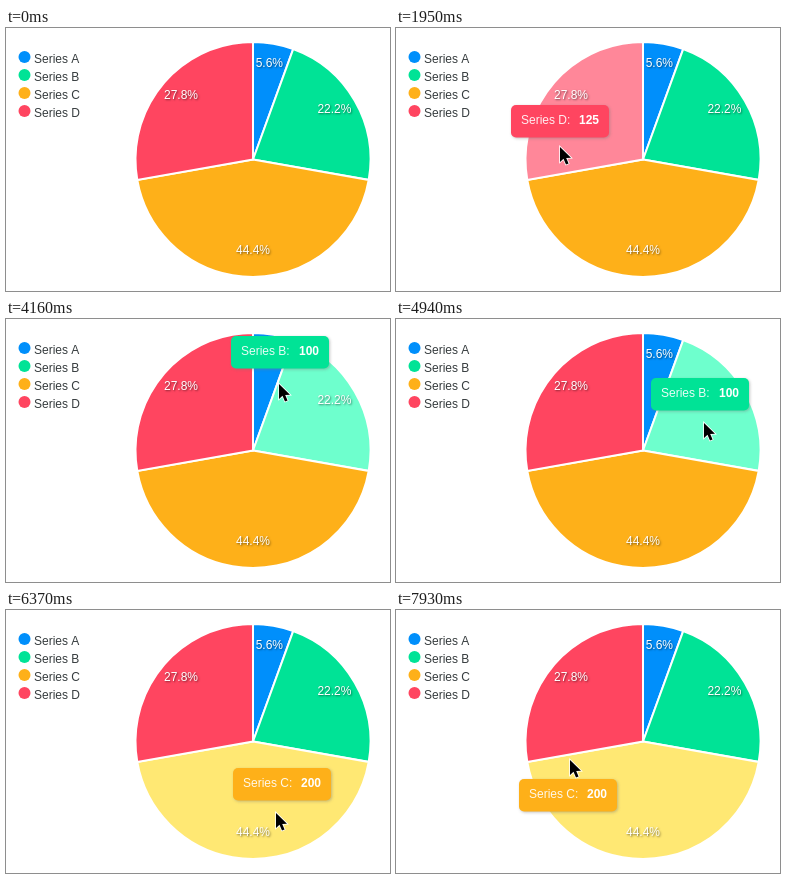
These frames come from a looping animation (384 by 263 pixels, 8 s). An HTML page with a canvas:

```html
<!DOCTYPE html>
<html lang="en">
<head>
<meta charset="utf-8">
<title>Pie chart</title>
<style>
html, body { margin: 0; width: 100%; height: 100%; overflow: hidden; background: #fff; }
canvas { display: block; }
</style>
</head>
<body>
<canvas id="stage" width="384" height="263"></canvas>
<script>
const ctx = document.getElementById('stage').getContext('2d');
const LOOP = 8000, STEP = 130;
const CX = 247, CY = 131.5, R = 117.5, LABEL_R = 94;
const FONT = '12px "Liberation Sans", Arial, sans-serif';

const series = [
  { name: 'Series A', value: 25, color: '#008ffb', lit: '#66bfff' },
  { name: 'Series B', value: 100, color: '#00e396', lit: '#6effcd' },
  { name: 'Series C', value: 200, color: '#feb019', lit: '#ffe873' },
  { name: 'Series D', value: 125, color: '#ff4560', lit: '#ff8799' }
];
const total = series.reduce((sum, s) => sum + s.value, 0);
let turn = 0;
for (const s of series) {
  s.from = turn;
  turn += s.value / total * Math.PI * 2;
  s.to = turn;
}

// Pointer path: step, x, y
const path = [
  [10, 215, -20], [11, 208, 0], [12, 196, 42], [13, 180, 88],
  [14, 163.5, 119], [15, 164, 119], [18, 158, 112], [20, 170, 118],
  [22, 178.5, 110], [23, 247, 68], [24, 258, 62], [28, 262, 57],
  [31, 274, 59], [32, 273, 65], [34, 284, 84], [38, 308, 104],
  [40, 298, 122], [42, 278, 172], [43, 279, 184], [46, 283, 196],
  [50, 268, 204], [53, 253, 207], [54, 176, 214], [56, 165, 208],
  [58, 168, 210], [60, 172, 211], [61, 174, 150]
];

function pointerAt(step) {
  if (step < path[0][0]) return null;
  const i = path.findIndex(p => p[0] >= step);
  if (i < 0) return path[path.length - 1].slice(1);
  if (i === 0) return path[0].slice(1);
  const [s0, x0, y0] = path[i - 1], [s1, x1, y1] = path[i];
  const u = (step - s0) / (s1 - s0), k = u * u * (3 - 2 * u);
  return [x0 + (x1 - x0) * k, y0 + (y1 - y0) * k];
}

function sliceAt(p) {
  if (!p || Math.hypot(p[0] - CX, p[1] - CY) > R) return null;
  const a = (Math.atan2(p[0] - CX, CY - p[1]) + Math.PI * 2) % (Math.PI * 2);
  return series.find(s => a < s.to);
}

function text(str, x, y, color, align = 'left', font = FONT) {
  ctx.font = font;
  ctx.textAlign = align;
  ctx.fillStyle = color;
  ctx.fillText(str, x, y);
}

function shadow(color, blur, offset) {
  ctx.shadowColor = color;
  ctx.shadowBlur = blur;
  ctx.shadowOffsetX = ctx.shadowOffsetY = offset;
}

function drawLegend() {
  series.forEach((s, i) => {
    const y = 29 + i * 18;
    ctx.fillStyle = s.color;
    ctx.beginPath();
    ctx.arc(18.5, y, 6, 0, Math.PI * 2);
    ctx.fill();
    text(s.name, 28, y + 6, '#373d3f');
  });
}

function drawPie(active) {
  ctx.strokeStyle = '#fff';
  ctx.lineWidth = 2;
  for (const s of series) {
    ctx.beginPath();
    ctx.moveTo(CX, CY);
    ctx.arc(CX, CY, R, s.from - Math.PI / 2, s.to - Math.PI / 2);
    ctx.closePath();
    ctx.fillStyle = s === active ? s.lit : s.color;
    ctx.fill();
    ctx.stroke();
  }
  ctx.save();
  shadow('rgba(0,0,0,0.5)', 2, 1);
  for (const s of series) {
    const mid = (s.from + s.to) / 2;
    const share = (s.value / total * 100).toFixed(1) + '%';
    text(share, CX + LABEL_R * Math.sin(mid), CY - LABEL_R * Math.cos(mid), '#fff', 'center');
  }
  ctx.restore();
}

function drawTooltip(s, p) {
  const x = Math.round(p[0] - 49), y = Math.round(p[1] - 42);
  ctx.save();
  shadow('rgba(120,120,120,0.45)', 3, 1);
  ctx.fillStyle = s.color;
  ctx.beginPath();
  ctx.roundRect(x, y, 98, 32.5, 5);
  ctx.fill();
  ctx.restore();
  text(s.name + ':', x + 10, y + 19, 'rgba(255,255,255,0.9)');
  text(s.value, x + 68, y + 19, '#fff', 'left', 'bold ' + FONT);
}

function drawPointer(p) {
  ctx.save();
  ctx.translate(Math.round(p[0]), Math.round(p[1]));
  ctx.beginPath();
  ctx.moveTo(0, 0);
  for (const [x, y] of [[0, 15], [3.5, 11.8], [6, 17.5], [8.6, 16.4], [6.2, 10.9], [11, 10.7]]) {
    ctx.lineTo(x, y);
  }
  ctx.closePath();
  ctx.strokeStyle = '#fff';
  ctx.lineWidth = 1.6;
  ctx.stroke();
  ctx.fillStyle = '#000';
  ctx.fill();
  ctx.restore();
}

function render(now) {
  const step = Math.floor(now % LOOP / STEP);
  const pointer = pointerAt(step);
  const trail = pointerAt(step - 1); // the tooltip lags one step behind
  const active = sliceAt(trail);
  ctx.fillStyle = '#fff';
  ctx.fillRect(0, 0, 384, 263);
  drawLegend();
  drawPie(active);
  if (active) drawTooltip(active, trail);
  if (pointer) drawPointer(pointer);
}

const start = performance.now();
function loop() {
  render(performance.now() - start);
  requestAnimationFrame(loop);
}
loop();
</script>
</body>
</html>
```
